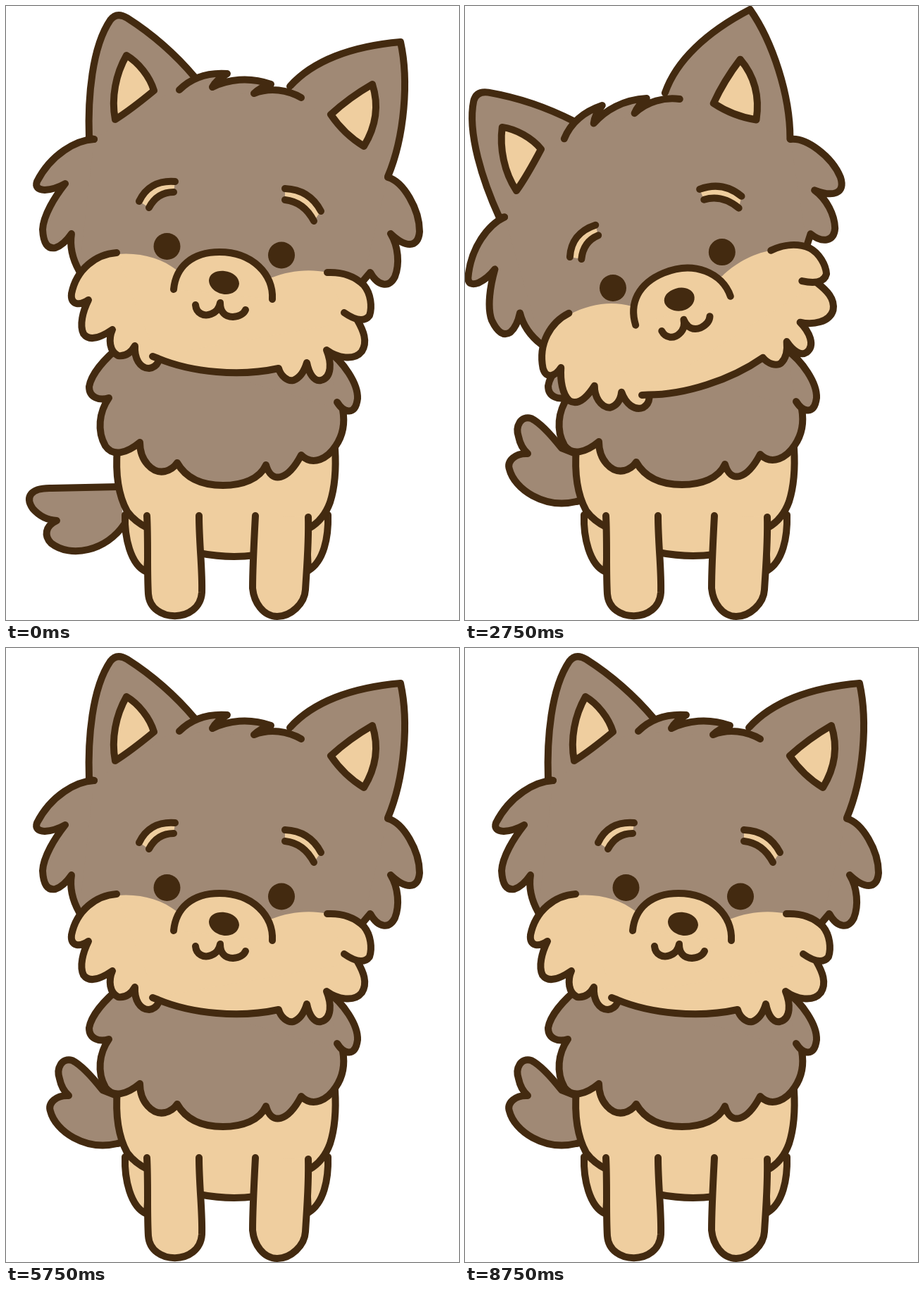
These frames come from a looping animation (643 by 871 pixels, 9 s). An HTML page with a canvas:

```html
<!DOCTYPE html>
<html lang="en">
<head>
<meta charset="utf-8">
<title>Puppy</title>
<style>
  html, body { margin: 0; width: 100%; height: 100%; overflow: hidden; background: #fff; }
  canvas { display: block; width: 643px; height: 871px; }
</style>
</head>
<body>
<canvas id="stage" width="643" height="871"></canvas>
<script>
const ctx = document.getElementById('stage').getContext('2d');
const LINE = '#432a10', BROWN = '#a08975', CREAM = '#efce9f';
const STEP = 250, STEPS = 36;
const paths = list => list.map(d => new Path2D(d));

const tailDown = paths(['M160 682L65 684C34 683 27 697 38 713Q52 729 72 730C55 738 54 752 64 762C92 784 142 773 168 735']);
const tailUp = paths(['M170 640L137 627C122 608 106 591 94 585C79 581 71 596 76 611Q79 626 89 635C72 634 59 645 63 657C70 685 112 714 158 703L172 700']);

const hindLegs = paths([
  'M169 722C168 752 176 793 200 803L204 735',
  'M457 722C458 754 451 788 429 801L426 735'
]);
const belly = paths(['M158 628C155 665 160 695 172 717Q183 732 202 741L274 776Q315 784 354 779L430 741Q451 729 460 704C467 682 469 660 467 628']);
const frontLegs = paths([
  'M200 723C202 762 200 800 202 834C205 876 275 876 278 832C279 800 274 762 274 723',
  'M354 723C352 760 350 800 350 826C352 846 365 866 385 866C404 866 424 848 425 828C427 795 430 760 429 725'
]);
const ruff = paths([
  'M165 480C140 500 121 522 118 540C118 556 133 560 146 556C132 576 129 603 141 624C152 640 172 634 190 619' +
  'C190 645 208 664 226 660Q237 657 243 648C256 671 280 680 308 680C336 680 360 671 369 651C377 679 400 673 419 637' +
  'C436 654 457 641 468 624C479 608 481 590 478 573',
  'M455 488C479 504 500 536 499 557C496 581 480 578 470 562'
]);
const ruffCore = paths(['M165 480L455 488L472 560L478 573L369 651L243 648L190 619L146 556Z']);

const headCore = paths(['M118 186L160 120L255 104L300 114L352 122L403 119L440 105L545 200L542 242L560 300L546 318L525 375L506 391L103 375L98 330L90 252Z']);
const headFur = paths([
  'M125 189L118 187C116 130 122 58 148 20Q157 8 172 17C205 38 240 68 268 101',
  'M403 114C435 78 490 57 560 51C572 105 566 185 542 242',
  'M246 119C262 103 285 94 314 96Q299 104 293 115C315 104 345 100 376 111Q361 115 352 124C375 115 400 119 419 130',
  'M542 243C564 249 587 288 587 320C585 345 566 342 546 323C557 341 559 366 552 384C544 400 528 398 517 378L506 391',
  'M125 189C100 190 64 210 44 249Q40 260 55 261Q70 260 84 252C69 271 53 297 52 317C53 337 59 345 70 343Q82 339 93 323C90 342 95 360 104 376'
]);
const innerEars = paths([
  'M171 70C188 80 204 100 210 120C193 134 176 148 155 161C149 130 156 96 171 70Z',
  'M520 111C530 142 525 171 508 199Q480 182 461 154Q487 130 520 111Z'
]);

const muzzleCore = paths(['M157 352C190 349 220 357 243 375L378 385C400 376 430 372 456 378L500 410L500 470L455 488L400 500L216 505L183 480L125 417L125 375Z']);
const muzzleFur = paths([
  'M157 350C128 352 100 373 93 408C91 425 105 425 117 417C109 433 104 453 110 465C119 477 135 470 151 459' +
  'C145 473 147 490 159 496Q174 498 183 482C182 500 190 514 203 514Q212 513 216 505',
  'M208 497L216 500C264 520 332 526 387 514C390 525 400 533 408 531Q421 526 427 506C430 521 437 533 447 531' +
  'C463 527 462 505 455 488C470 499 494 504 505 490C514 476 507 460 499 446',
  'M480 435C493 444 508 450 516 439C520 427 518 408 508 396C495 383 476 377 456 378'
]);
const snout = paths(['M238 402C241 370 264 349 303 349C350 349 380 381 378 416']);
const nose = paths(['M288 389C289 379 299 375 310 376C322 377 331 385 331 394C330 404 321 409 312 409C300 409 288 400 288 389Z']);
const mouth = paths(['M269 424C270 436 281 441 291 437Q302 433 304 421C304 434 311 441 322 441Q336 440 340 431']);

const browFill = paths([
  'M189 277C198 258 215 247 240 249L238 264C222 264 211 271 203 286Z',
  'M396 259C420 260 437 272 447 291L437 305C428 288 415 277 396 275Z'
]);
const brows = paths([
  'M189 277C198 258 215 247 240 249', 'M203 286C211 271 222 264 238 264',
  'M396 259C420 260 437 272 447 291', 'M396 275C415 277 428 288 437 305'
]);

function fill(list, color) {
  ctx.fillStyle = color;
  list.forEach(p => ctx.fill(p));
}

function ink(list) {
  list.forEach(p => ctx.stroke(p));
}

function shape(list, color) {
  fill(list, color);
  ink(list);
}

function eye(x, y, shut) {
  ctx.fillStyle = LINE;
  ctx.beginPath();
  ctx.ellipse(x, y + (shut ? 3.5 : 0), 19, shut ? 14 : 19, 0, 0, Math.PI * 2);
  ctx.fill();
}

// Turn the head by an angle, keeping the left eye at (x, y).
function tilt(deg, x, y) {
  ctx.translate(x, y);
  ctx.rotate(deg * Math.PI / 180);
  ctx.translate(-228.5, -341);
}

function pose(step) {
  const within = (a, b) => step >= a && step < b;
  if (within(10, 14) || within(18, 22)) tilt(-22.6, 210, 401);
  else if (within(26, 30)) tilt(14, 248, 343);
}

function drawHead(step) {
  const shut = step === 5;
  ctx.save();
  pose(step);
  fill(headCore, BROWN);
  fill(headFur, BROWN);
  ink(headFur);
  shape(innerEars, CREAM);
  fill(browFill, CREAM);
  ink(brows);
  fill(muzzleCore, CREAM);
  fill(muzzleFur, CREAM);
  ink(muzzleFur);
  eye(228.5, 341, shut);
  eye(391, 353.5, shut);
  shape(snout, CREAM);
  fill(nose, LINE);
  ink(mouth);
  ctx.restore();
}

function draw(step) {
  const up = step % 2;
  ctx.setTransform(1, 0, 0, 1, 0, 0);
  ctx.fillStyle = '#fff';
  ctx.fillRect(0, 0, 643, 871);
  ctx.strokeStyle = LINE;
  ctx.lineWidth = 10;
  ctx.lineCap = ctx.lineJoin = 'round';

  shape(up ? tailUp : tailDown, BROWN);
  shape(hindLegs, CREAM);
  ctx.translate(0, -up);
  shape(belly, CREAM);
  ctx.translate(0, up);
  shape(frontLegs, CREAM);
  ctx.translate(0, -up);
  fill(ruffCore, BROWN);
  fill(ruff, BROWN);
  ink(ruff);
  drawHead(step);
}

let last = -1;
function tick(now) {
  const step = Math.floor(now / STEP) % STEPS;
  if (step !== last) draw(last = step);
  requestAnimationFrame(tick);
}
draw(0);
requestAnimationFrame(tick);
</script>
</body>
</html>
```
